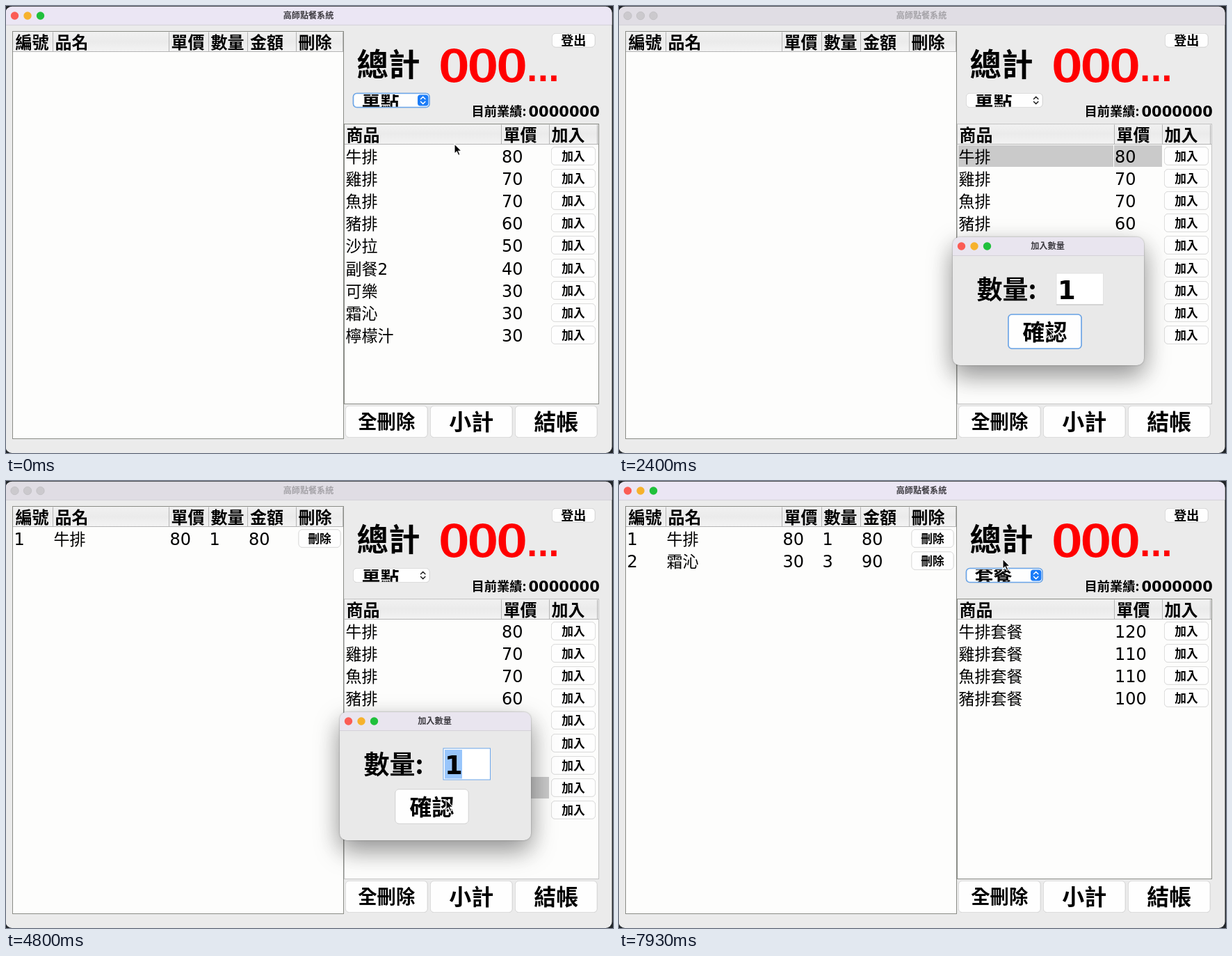
These frames come from a looping animation (873x642 px, 8 s). An HTML page:

```html
<!DOCTYPE html>
<html lang="zh-Hant">
<head>
<meta charset="utf-8">
<title>點餐系統</title>
<style>
  html, body { margin: 0; width: 100%; height: 100%; overflow: hidden; background: #22262a; }
  svg { display: block; width: 100vw; height: 100vh; }
  text { font-family: "DejaVu Sans", "Noto Sans CJK TC", "Noto Sans CJK", sans-serif; white-space: pre; }
  .b { font-weight: 700; }
  .label { font-family: "Noto Sans CJK TC", "Noto Sans CJK", sans-serif; }
  .total { fill: #f00; stroke: #ebebeb; stroke-width: 2.2px; }
  .button { filter: drop-shadow(0 .6px .6px rgba(0, 0, 0, .22)); }
  .dialog { filter: drop-shadow(0 14px 18px rgba(0, 0, 0, .35)) drop-shadow(0 0 1px rgba(0, 0, 0, .35)); }
  .popup { filter: drop-shadow(0 4px 6px rgba(0, 0, 0, .3)); }
</style>
</head>
<body>
<svg viewBox="0 0 873 642" preserveAspectRatio="none">
  <defs>
    <linearGradient id="head" x2="0" y2="1">
      <stop offset="0" stop-color="#f1f1f1"/>
      <stop offset=".5" stop-color="#ebebeb"/>
      <stop offset="1" stop-color="#f3f3f3"/>
    </linearGradient>
    <clipPath id="comboClip"><rect x="501" y="127" width="88" height="17.8"/></clipPath>
  </defs>
  <g id="scene"></g>
  <path id="cursor" d="M0 0V14.2L3.3 11.2L5.6 16.4L8 15.4L5.7 10.4H10.2Z" fill="#000" stroke="#fff" stroke-width="1.1"/>
</svg>
<script>
const LOOP = 8000;
const ROW = 32.1;
const BLUE = '#0a3bd5';
const RING = '#6ba6ea';

const single = [['牛排', 80], ['雞排', 70], ['魚排', 70], ['豬排', 60], ['沙拉', 50],
  ['副餐2', 40], ['可樂', 30], ['霜沁', 30], ['檸檬汁', 30]];
const combos = [['牛排套餐', 120], ['雞排套餐', 110], ['魚排套餐', 110], ['豬排套餐', 100]];

// Each step changes part of the state from its time on.
const steps = [
  [0, { focus: 'combo', selected: -1, dialog: false, qty: 1, orders: [], menu: '單點', popup: -1 }],
  [1000, { focus: 'table', selected: 0 }],
  [1200, { dialog: true, focus: 'field' }],
  [2300, { focus: 'confirm' }],
  [2530, { dialog: false, focus: '', orders: [['牛排', 80, 1]] }],
  [2600, { focus: 'table' }],
  [3570, { selected: 7 }],
  [3760, { dialog: true, focus: 'field' }],
  [5200, { qty: 3 }],
  [5800, { focus: 'confirm' }],
  [6000, { dialog: false, focus: '', orders: [['牛排', 80, 1], ['霜沁', 30, 3]] }],
  [6120, { focus: 'table' }],
  [6950, { focus: 'combo', popup: 0 }],
  [7250, { popup: 1 }],
  [7520, { popup: -1, menu: '套餐', selected: -1 }]
];
const states = [];
for (const [at, change] of steps) states.push({ ...states.at(-1), ...change, at });

// time, x, y of the pointer tip
const path = [
  [0, 645, 198], [200, 645, 198], [900, 830, 217], [1300, 830, 217], [2150, 615, 462],
  [2700, 615, 462], [3400, 803, 433], [3900, 803, 433], [4650, 633, 458], [6150, 633, 458],
  [6800, 560, 135], [7050, 560, 135], [7300, 556, 164], [7560, 556, 164], [7880, 552, 112], [LOOP, 552, 112]
];

const rect = (x, y, w, h, fill, more = '') =>
  `<rect x="${x}" y="${y}" width="${w}" height="${h}" fill="${fill}" ${more}/>`;
const line = (x1, y1, x2, y2, color) =>
  `<path d="M${x1} ${y1}L${x2} ${y2}" stroke="${color}"/>`;
const text = (x, y, size, str, more = '', cls = '') =>
  `<text x="${x}" y="${y}" font-size="${size}" class="${cls}" ${more}>${str}</text>`;
const bold = (x, y, size, str, more = '', cls = '') => text(x, y, size, str, more, `b ${cls}`);
const centered = (x, y, size, str, more = '') => bold(x, y, size, str, `text-anchor="middle" ${more}`);

function button(x, y, w, h, label, size, focused) {
  const edge = focused ? `stroke="${RING}" stroke-width="1.6"` : 'stroke="#dcdcdc" stroke-width=".8"';
  return rect(x, y, w, h, '#fefefe', `rx="5" class="button" ${edge}`) +
    centered(x + w / 2, y + h / 2 + size * .38, size, label);
}

function lights(x, y, active) {
  return ['#fb5c55', '#f6b22d', '#20c03c'].map((color, i) =>
    `<circle cx="${x + i * 18.5}" cy="${y}" r="5.7" fill="${active ? color : '#cbc9cd'}"
      stroke="${active ? 'none' : '#bcbabf'}" stroke-width=".7"/>`).join('');
}

function table(x, y, w, h, columns, edge, edgeWidth = 1) {
  return rect(x, y, w, h, '#fdfdfc') +
    rect(x, y, w, 29, 'url(#head)') +
    line(x, y + 29, x + w, y + 29, '#b4b4b4') +
    columns.map(([label, left, end]) =>
      bold(left, y + 24.5, 24, label) + line(end, y + 1, end, y + 29, '#b4b4b4')).join('') +
    rect(x, y, w, h, 'none', `stroke="${edge}" stroke-width="${edgeWidth}"`);
}

function orderTable(s) {
  const columns = [['編號', 13.5, 67.5], ['品名', 70.5, 234.5], ['單價', 237.5, 291.5],
    ['數量', 294.5, 347.5], ['金額', 351, 417.5], ['刪除', 420.5, 484.5]];
  return table(9.5, 36.5, 476, 585, columns, '#8a8c86') + s.orders.map(([name, price, count], i) => {
    const y = 92.3 + i * 32;
    return text(11.5, y, 24, i + 1) + text(68.5, y, 23, name) + text(235.5, y, 24, price) +
      text(292.5, y, 24, count) + text(349, y, 24, price * count) +
      button(421, y - 22.5, 60, 25.5, '刪除', 16.7);
  }).join('');
}

function productTable(s) {
  const columns = [['商品', 489.5, 712.5], ['單價', 715.5, 781.5], ['加入', 784.5, 850.5]];
  const products = s.menu === '單點' ? single : combos;
  const edge = s.focus === 'table' ? ['#4f9be0', 1.5] : [s.focus === 'combo' ? '#8a8c86' : '#c4c4c4'];
  return table(486.5, 169.5, 366, 402, columns, ...edge) + products.map(([name, price], i) => {
    const top = Math.round(200 + i * ROW);
    const on = i === s.selected;
    const back = s.dialog ? '#cacaca' : BLUE;
    const ink = `fill="${on && !s.dialog ? '#fff' : '#000'}"`;
    return (on ? rect(488, top, 223, 31, back) + rect(712, top, 69, 31, back) : '') +
      text(488.5, top + 25, 23, name, ink) + text(713, top + 25, 24, price, ink) +
      button(784.5, top + 2.7, 63, 25.5, '加入', 16.7);
  }).join('');
}

function comboBox(s) {
  const focused = s.focus === 'combo';
  return rect(499.5, 125.5, 109.5, 20, '#fefefe',
      `rx="5" class="button" stroke="${focused ? RING : '#dcdcdc'}" stroke-width="${focused ? 1.6 : .8}"`) +
    `<g clip-path="url(#comboClip)">${bold(511.5, 146, 27, s.menu)}</g>` +
    (s.dialog ? '' : rect(592, 127.5, 15.5, 16, '#1b7cf8', 'rx="4"')) +
    `<path d="M596.6 133.6L599.7 130.4L602.8 133.6M596.6 137.4L599.7 140.6L602.8 137.4" fill="none"
      stroke="${s.dialog ? '#222' : '#fff'}" stroke-width="1.5" stroke-linecap="round" stroke-linejoin="round"/>`;
}

function popup(s) {
  if (s.popup < 0) return '';
  return `<g class="popup">${rect(490, 115, 120, 72, '#ececec', 'rx="6" stroke="#c4c4c4" stroke-width=".8"')}</g>` +
    rect(495, 120 + s.popup * 31, 110, 31, '#2f7cf0', 'rx="4"') +
    ['單點', '套餐'].map((label, i) =>
      bold(514, 145.5 + i * 31, 26, label, `fill="${i === s.popup ? '#fff' : '#000'}"`)).join('') +
    `<path d="M499 136l3.5 4l6-9" fill="none" stroke="${s.popup ? '#000' : '#fff'}" stroke-width="2"/>`;
}

function dialog(s) {
  if (!s.dialog) return '';
  const typing = s.focus === 'field';
  return `<g class="dialog">${rect(480, 332, 275, 184, '#e9e9e9', 'rx="10"')}</g>` +
    `<path d="M480 358V342a10 10 0 0 1 10-10H745a10 10 0 0 1 10 10V358Z" fill="#e9e5ef"/>` +
    line(480, 358.5, 755, 358.5, '#d4d1d8') +
    lights(492.5, 345, true) + centered(616.5, 349.3, 12.2, '加入數量', 'fill="#3f3d43"') +
    bold(514.5, 421, 37, '數量:', '', 'label') +
    rect(629, 384, 67.5, 45, '#fff', `stroke="${typing ? RING : '#e2e2e2'}"`) +
    (typing ? '' : line(629, 429, 696.5, 429, '#bdbdbd')) +
    (typing && s.qty === 1 ? rect(631, 386, 25, 41.5, '#98c5fb') : '') +
    bold(631, 421, 37, s.qty) +
    (typing && s.qty > 1 ? line(657.5, 388, 657.5, 426, '#000') : '') +
    button(560, 443, 105, 49, '確認', 32, s.focus === 'confirm');
}

function scene(s) {
  const active = !s.dialog;
  return rect(-.5, .8, 872, 641.2, '#ebebeb', 'rx="9"') +
    `<path d="M-.5 27V10a9 9 0 0 1 9-9H862.5a9 9 0 0 1 9 9V27Z" fill="${active ? '#ebe6f4' : '#e0dde4'}"/>` +
    line(0, 27.3, 871, 27.3, '#d3d0d8') +
    lights(12.5, 14, active) +
    centered(435, 18, 12.1, '高師點餐系統', `fill="${active ? '#3f3d43' : '#a5a3a8'}"`) +
    orderTable(s) +
    bold(504.5, 100.5, 45.5, '總計') +
    bold(621, 109.5, 67, '000', 'letter-spacing="-5"', 'total') +
    bold(746, 109, 56, '...', 'letter-spacing="-5.6"', 'total') +
    button(785.5, 39.5, 61.5, 19.5, '登出', 18) +
    comboBox(s) +
    bold(669.5, 158, 18.3, '目前業績:', '', 'label') + bold(751.5, 159, 21, '0000000') +
    productTable(s) +
    button(488.5, 574.5, 117.5, 45, '全刪除', 27.3) +
    button(610.5, 574.5, 117.5, 45, '小計', 32) +
    button(732.5, 574.5, 117.5, 45, '結帳', 32) +
    popup(s) + dialog(s);
}

const stage = document.getElementById('scene');
const cursor = document.getElementById('cursor');
let shown;

function draw(now) {
  const t = now % LOOP;
  const state = states.findLast(s => s.at <= t);
  if (state !== shown) stage.innerHTML = scene(shown = state);

  const next = path.findIndex(p => p[0] > t);
  const [t0, x0, y0] = path[next - 1];
  const [t1, x1, y1] = path[next];
  const u = (t - t0) / (t1 - t0);
  const k = u * u * (3 - 2 * u);
  cursor.setAttribute('transform', `translate(${x0 + (x1 - x0) * k} ${y0 + (y1 - y0) * k})`);
}

const start = performance.now();
function tick() {
  draw(performance.now() - start);
  requestAnimationFrame(tick);
}
tick();
</script>
</body>
</html>
```
